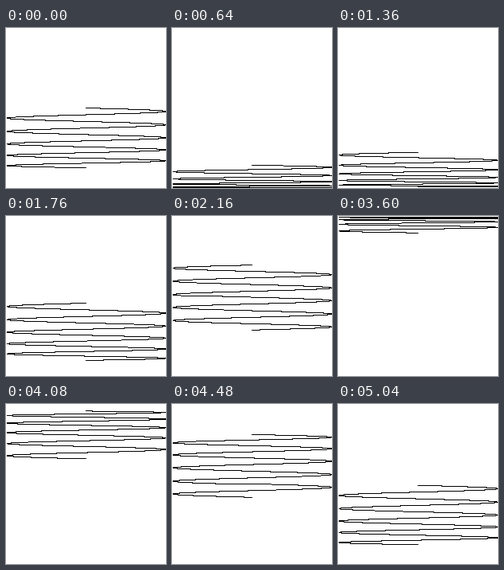
Recreate the animation shown at these times as an HTML page with a canvas. Size 201 by 201 pixels, loop 5.12 s.

```html
<!DOCTYPE html>
<html lang="en">
<head>
<meta charset="utf-8">
<title>Lissajous</title>
<style>
  html, body { margin: 0; width: 100%; height: 100%; overflow: hidden; background: #fff; }
  canvas { display: block; width: 201px; height: 201px; image-rendering: pixelated; }
</style>
</head>
<body>
<canvas id="stage" width="201" height="201"></canvas>
<script>
const RADIUS = 100;
const SIDE = 2 * RADIUS + 1;
const CYCLES = 5;
const STEP = 0.001;
const FREQUENCY = 0.027115;
const FRAMES = 64;
const FRAME_MS = 80;
const PHASE_STEP = 0.1;
const BLACK = 0xff000000;
const WHITE = 0xffffffff;

const ctx = document.getElementById('stage').getContext('2d');
const image = ctx.createImageData(SIDE, SIDE);
const pixels = new Uint32Array(image.data.buffer);

// Truncation toward zero keeps the pixel steps of the curve crisp.
const toPixel = v => RADIUS + Math.trunc(v * RADIUS + 0.5);

function draw(phase) {
  pixels.fill(WHITE);
  for (let t = 0; t < CYCLES * 2 * Math.PI; t += STEP) {
    const x = toPixel(Math.sin(t));
    const y = toPixel(Math.sin(t * FREQUENCY + phase));
    pixels[y * SIDE + x] = BLACK;
  }
  ctx.putImageData(image, 0, 0);
}

let shown = -1;
function tick() {
  const frame = Math.floor(performance.now() / FRAME_MS) % FRAMES;
  if (frame !== shown) {
    shown = frame;
    draw(frame * PHASE_STEP);
  }
  requestAnimationFrame(tick);
}
tick();
</script>
</body>
</html>
```
